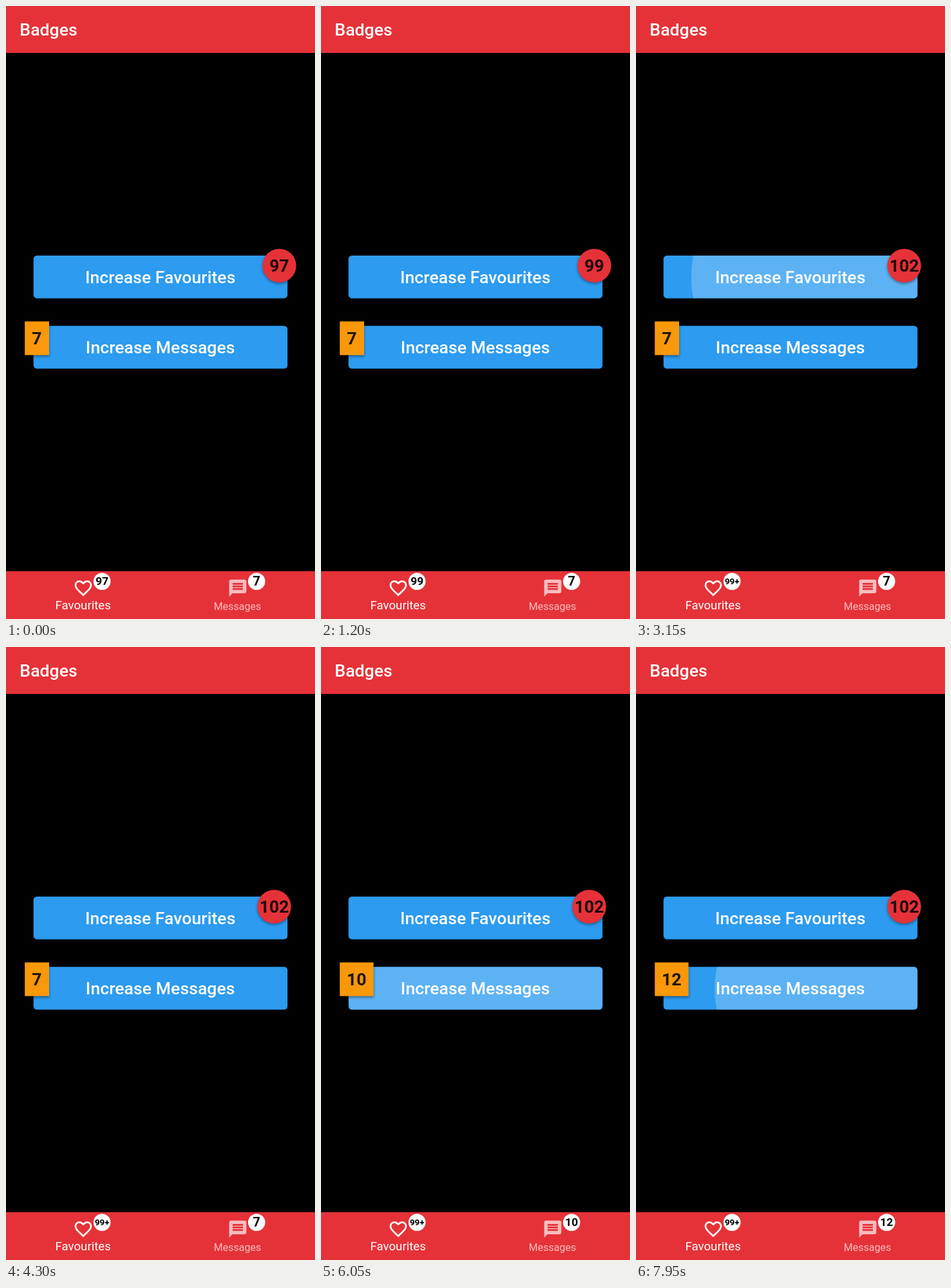
Recreate the animation shown at these times as an HTML page with a canvas. Size 480 by 953 pixels, loop 8000 ms.

```html
<!DOCTYPE html>
<html lang="en">
<head>
<meta charset="utf-8">
<title>Badges</title>
<style>
html, body { margin: 0; width: 100%; height: 100%; overflow: hidden; background: #000; }
canvas { display: block; width: 480px; height: 953px; }
</style>
</head>
<body>
<canvas id="stage"></canvas>
<script>
const W = 480, H = 953, LOOP = 8000, DP = 4 / 3;
const RED = '#e53238', BLUE = '#2c9bf0', ORANGE = '#f8980a';
const PALE = 'rgba(255,255,255,0.68)';
const PRESS = 100, GROW = 225, FADE_IN = 75, FADE_OUT = 375;

const canvas = document.getElementById('stage');
const ctx = canvas.getContext('2d');
const ratio = window.devicePixelRatio || 1;
canvas.width = W * ratio;
canvas.height = H * ratio;

const heart = new Path2D('M16.5 3c-1.74 0-3.41.81-4.5 2.09C10.91 3.81 9.24 3 7.5 3 4.42 3 2 5.42 2 8.5c0 3.78 3.4 6.86 8.55 11.54L12 21.35l1.45-1.32C18.6 15.36 22 12.28 22 8.5 22 5.42 19.58 3 16.5 3zM12.1 18.55l-.1.1-.1-.1C7.14 14.24 4 11.39 4 8.5 4 6.5 5.5 5 7.5 5c1.54 0 3.04.99 3.57 2.36h1.87C13.46 5.99 14.96 5 16.5 5c2 0 3.5 1.5 3.5 3.5 0 2.89-3.14 5.74-7.9 10.05z');
const message = new Path2D('M20 2H4c-1.1 0-1.99.9-1.99 2L2 22l4-4h14c1.1 0 2-.9 2-2V4c0-1.1-.9-2-2-2zm-2 12H6v-2h12v2zm0-3H6V9h12v2zm0-3H6V6h12v2z');

// Release times of the taps on each button
const favourites = { label: 'Increase Favourites', top: 388, start: 97, taps: [130, 820, 1590, 2430, 3060] };
const messages = { label: 'Increase Messages', top: 497.3, start: 7, taps: [4530, 5150, 5900, 6625, 7885] };
const BOX = { x: 42.7, w: 394.6, h: 66.4 };

const clamp = v => Math.min(1, Math.max(0, v));

// cubic-bezier(.25, .1, .25, 1)
function ease(x) {
  let lo = 0, hi = 1;
  const bez = (a, b, s) => 3 * a * s * (1 - s) ** 2 + 3 * b * s * s * (1 - s) + s ** 3;
  for (let i = 0; i < 24; i++) {
    const mid = (lo + hi) / 2;
    if (bez(.25, .25, mid) < x) lo = mid; else hi = mid;
  }
  return bez(.1, 1, lo);
}

function text(str, x, y, size, weight, color, align = 'center') {
  ctx.font = `${weight} ${size}px Roboto, sans-serif`;
  ctx.textAlign = align;
  ctx.fillStyle = color;
  ctx.fillText(str, x, y);
}

function circle(x, y, r, color) {
  ctx.fillStyle = color;
  ctx.beginPath();
  ctx.arc(x, y, r, 0, Math.PI * 2);
  ctx.fill();
}

function icon(path, x, y, color) {
  ctx.save();
  ctx.translate(x, y);
  ctx.scale(DP, DP);
  ctx.fillStyle = color;
  ctx.fill(path);
  ctx.restore();
}

function withShadow(draw) {
  ctx.save();
  ctx.shadowColor = 'rgba(0,0,0,0.4)';
  ctx.shadowBlur = 4 * ratio;
  ctx.shadowOffsetY = 2 * ratio;
  draw();
  ctx.restore();
}

function ripple(t, up, top) {
  const down = up - PRESS, after = t - up;
  if (t < down || after > FADE_OUT) return;
  const held = Math.min(t - down, PRESS) / 1000;
  const e = ease(clamp(held + Math.max(0, after) / GROW));
  const fade = 1 - clamp((after - GROW) / (FADE_OUT - GROW));
  const alpha = 0.23 * clamp((t - down) / FADE_IN) * fade;
  const full = Math.hypot(BOX.w, BOX.h) / 2;
  const r = full * 0.3 + (full * 0.7 + 5 * DP) * e;
  const cx = 365 + (W / 2 - 365) * e;
  const cy = top + 36 + (BOX.h / 2 - 36) * e;
  circle(cx, cy, r, `rgba(255,255,255,${alpha})`);
}

function button(b, t) {
  ctx.save();
  ctx.beginPath();
  ctx.roundRect(BOX.x, b.top, BOX.w, BOX.h, 5.3);
  ctx.fillStyle = BLUE;
  ctx.fill();
  ctx.clip();
  b.taps.forEach(up => ripple(t, up, b.top));
  ctx.restore();
  text(b.label, W / 2 - 0.3, b.top + 43, 20 * DP, 500, '#fff');
}

const count = (b, t) => b.start + b.taps.filter(up => t >= up).length;

function navBadge(n, x) {
  const label = n > 99 ? '99+' : String(n);
  const size = [15, 13, 10][label.length - 1] * DP;
  circle(x, 894.5, 13.3, '#fff');
  text(label, x, 894.3 + size * 0.355, size, 700, '#000');
}

function draw(t) {
  ctx.setTransform(ratio, 0, 0, ratio, 0, 0);
  ctx.fillStyle = '#000';
  ctx.fillRect(0, 0, W, H);
  ctx.fillStyle = RED;
  ctx.fillRect(0, 0, W, 73);
  ctx.fillRect(0, 878.6, W, H - 878.6);
  text('Badges', 21.3, 46, 20 * DP, 500, '#fff', 'left');

  button(favourites, t);
  button(messages, t);

  const fav = count(favourites, t), msg = count(messages, t);
  const ink = 'rgba(0,0,0,0.87)';

  const cx = fav > 99 ? 416.6 : 424.6;
  withShadow(() => circle(cx, 403.6, 26.2, RED));
  text(fav, cx, 413, 20 * DP, 700, ink);

  const w = msg > 9 ? 52.4 : 37.8;
  withShadow(() => {
    ctx.fillStyle = ORANGE;
    ctx.fillRect(29.2, 490.4, w, 52.3);
  });
  text(msg, 29 + w / 2, 526.4, 20 * DP, 700, ink);

  icon(heart, 104, 889, '#fff');
  icon(message, 344, 889, PALE);
  text('Favourites', 119.7, 938, 14 * DP, 400, '#fff');
  text('Messages', 359.5, 939, 12 * DP, 400, PALE);
  navBadge(fav, 149.2);
  navBadge(msg, 389.3);
}

const begin = performance.now();
function tick() {
  draw((performance.now() - begin) % LOOP);
  requestAnimationFrame(tick);
}
tick();
</script>
</body>
</html>
```
